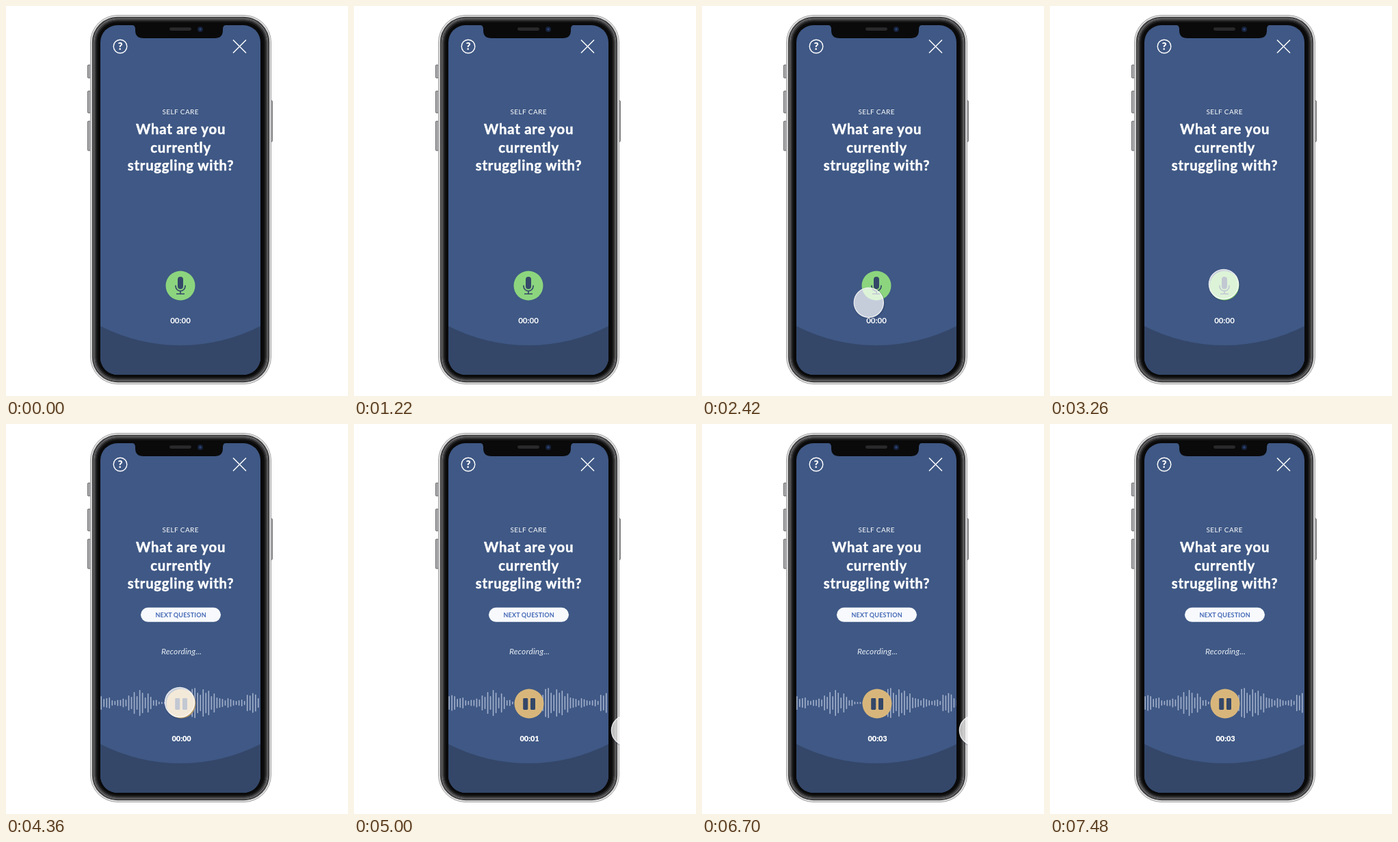
An HTML page that plays this animation: 500 by 569 pixels, repeating every 7500 ms.

```html
<!DOCTYPE html>
<html lang="en">
<head>
<meta charset="utf-8">
<title>Voice journal</title>
<style>
  html, body { margin: 0; width: 100%; height: 100%; overflow: hidden; background: #fff; }
  svg { display: block; width: 100vw; height: 100vh; }
  text { font-family: Lato, "Open Sans", sans-serif; fill: #fff; }
  .mid { text-anchor: middle; }
  .title { font-size: 20.3px; font-weight: 700; letter-spacing: .8px; stroke: #fff; stroke-width: .5px; }
  .time { font-size: 11.5px; font-weight: 700; }
</style>
</head>
<body>
<svg viewBox="0 0 500 569" xmlns="http://www.w3.org/2000/svg">
  <defs>
    <clipPath id="screenClip"><rect x="138" y="28" width="234" height="510" rx="25"/></clipPath>
    <clipPath id="phoneClip"><rect x="123" y="13" width="265" height="539" rx="40"/></clipPath>
  </defs>

  <!-- phone body -->
  <g fill="#a9a9ab" stroke="#505052" stroke-width=".8">
    <rect x="119.4" y="86" width="4" height="19" rx="1.2"/>
    <rect x="119.4" y="124" width="4" height="32" rx="1.2"/>
    <rect x="119.4" y="168" width="4" height="43" rx="1.2"/>
    <rect x="386" y="138" width="3.4" height="60" rx="1.2"/>
  </g>
  <g fill="none">
    <rect x="123.5" y="13.5" width="264" height="538" rx="39.5" fill="#e2e2e2" stroke="#a2a2a4"/>
    <rect x="126.5" y="16.5" width="258" height="532" rx="36.5" fill="#0a0a0b" stroke="#48484a" stroke-width="1.4"/>
    <rect x="128.5" y="18.5" width="254" height="528" rx="34.5" stroke="#6a6a6c" stroke-width="2"/>
    <rect x="130.5" y="20.5" width="250" height="524" rx="32.5" stroke="#434345" stroke-width="2"/>
    <rect x="132.5" y="22.5" width="246" height="520" rx="30.5" stroke="#1d1d1e" stroke-width="2"/>
  </g>

  <!-- screen -->
  <g clip-path="url(#screenClip)">
    <rect x="138" y="28" width="234" height="510" fill="#3f5885"/>
    <path d="M138 467A258 258 0 0 0 372 467V538H138Z" fill="#344769"/>
    <circle cx="167" cy="59" r="9.8" fill="none" stroke="#fff" stroke-width="1.4"/>
    <text class="mid" x="167" y="64.3" font-size="15" font-weight="900">?</text>
    <path d="M332 49.5L351 68.5M351 49.5L332 68.5" stroke="#fff" stroke-width="1.5"/>

    <text class="mid" x="255.2" y="157.6" font-size="10" letter-spacing=".4">SELF CARE</text>
    <g class="mid title">
      <text x="255.6" y="187">What are you</text>
      <text x="255.6" y="213.5">currently</text>
      <text x="255.6" y="239.8">struggling with?</text>
    </g>

    <g id="idle">
      <circle cx="255" cy="408" r="21.5" fill="#8cd57e"/>
      <rect x="251" y="395" width="8" height="18" rx="4" fill="#344769"/>
      <path d="M248 407.5v1.3a7 7 0 0 0 14 0v-1.3M255 416v4M249 420h12" fill="none" stroke="#344769" stroke-width="1.7"/>
      <text class="mid time" x="255" y="462.7">00:00</text>
    </g>

    <g id="live" opacity="0">
      <rect x="197" y="267.8" width="117" height="21" rx="10.5" fill="#f7f9fd"/>
      <text class="mid" x="255.6" y="281.8" font-size="9" font-weight="700" letter-spacing=".2" style="fill:#4368b5">NEXT QUESTION</text>
      <text class="mid" x="256.5" y="336.2" font-size="12" font-style="italic" letter-spacing=".12" style="fill:#e6ebf4">Recording...</text>
      <g id="wave" stroke="#a3b1cc" stroke-width="1.6" stroke-linecap="round"></g>
      <circle cx="256" cy="408" r="21.5" fill="#d8b67b"/>
      <rect x="247.2" y="400" width="7" height="17" rx="1.4" fill="#344769"/>
      <rect x="258" y="400" width="7" height="17" rx="1.4" fill="#344769"/>
      <text id="clock" class="time" x="242.6" y="462.5" style="font-size:11px;font-weight:900;letter-spacing:-.1px">00:00</text>
    </g>
  </g>

  <!-- notch -->
  <path d="M183 27.5q6 0 6 6v2q0 11.5 12 11.5h104q12 0 12-11.5v-2q0-6 6-6z" fill="#0a0a0b"/>
  <rect x="239" y="31.3" width="32" height="4.6" rx="2.3" fill="#29292b"/>
  <circle cx="284" cy="34" r="4" fill="#17223b"/>
  <circle cx="284" cy="34" r="1.7" fill="#2c4474"/>

  <!-- touch pointer -->
  <g clip-path="url(#phoneClip)">
    <g id="touch">
      <circle cx=".6" cy="1.2" r="22.4" fill="none" stroke="#1d2c4a" stroke-opacity=".25" stroke-width="1.6"/>
      <circle r="21.6" fill="#fff" fill-opacity=".7" stroke="#fff" stroke-opacity=".85" stroke-width="1.3"/>
    </g>
  </g>
</svg>

<script>
const LOOP = 7500;
const $ = id => document.getElementById(id);
const idle = $('idle'), live = $('live'), wave = $('wave'), clock = $('clock'), touch = $('touch');

// bar heights, left to right
const bars = [
  8, 12, 10, 20, 23, 20, 12, 14, 16, 8, 6, 9, 9, 13, 10, 22, 18, 32, 20, 38, 30, 16, 28, 18, 8, 9, 4, 3,
  3, 3, 4, 3, 4, 6, 9, 12, 16, 24,
  41, 44, 30, 24, 40, 30, 36, 20, 28, 16, 14, 12, 8, 14, 11, 8, 6, 8, 10, 6, 24, 22, 29, 25, 14,
  10, 12, 7, 5
];
const BAR_X = 127, BAR_GAP = 4.03, WAVE_Y = 407;
bars.forEach((h, i) => {
  const line = document.createElementNS('http://www.w3.org/2000/svg', 'line');
  const x = BAR_X + i * BAR_GAP, half = (h - 1.6) / 2;
  for (const [k, v] of Object.entries({ x1: x, x2: x, y1: WAVE_Y - half, y2: WAVE_Y + half }))
    line.setAttribute(k, v);
  wave.append(line);
});

const easeOut = p => 1 - (1 - p) ** 3;
const easeOutHard = p => 1 - (1 - p) ** 5;
const easeBoth = p => p * p * (3 - 2 * p);

// pointer moves: start, end, target x, target y, easing
const home = [400, 590];
const moves = [
  [1800, 2060, 241, 440, easeOutHard],
  [2200, 2940, 254, 406, easeBoth],
  [4380, 4700, 398, 447, easeOut],
  [7000, 7200, 425, 447, easeBoth]
];

const progress = (t, a, b) => Math.min(1, Math.max(0, (t - a) / (b - a)));

function pointer(t) {
  let [x, y] = home;
  for (const [a, b, tx, ty, ease] of moves) {
    const p = ease(progress(t, a, b));
    x += (tx - x) * p;
    y += (ty - y) * p;
  }
  return [x, y];
}

function render(t) {
  const [x, y] = pointer(t);
  touch.setAttribute('transform', `translate(${x} ${y})`);

  const fade = progress(t, 3340, 3700);
  idle.setAttribute('opacity', 1 - fade);
  live.setAttribute('opacity', fade);

  const drift = -2.37 - 6 * Math.cos(Math.PI * (t - 4220) / 1240);
  wave.setAttribute('transform', `translate(${drift} 0)`);

  const seconds = Math.min(3, Math.max(0, Math.floor((t - 3680) / 1000)));
  clock.textContent = '00:0' + seconds;
}

const start = performance.now();
function tick() {
  render((performance.now() - start) % LOOP);
  requestAnimationFrame(tick);
}
render(0);
requestAnimationFrame(tick);
</script>
</body>
</html>
```
